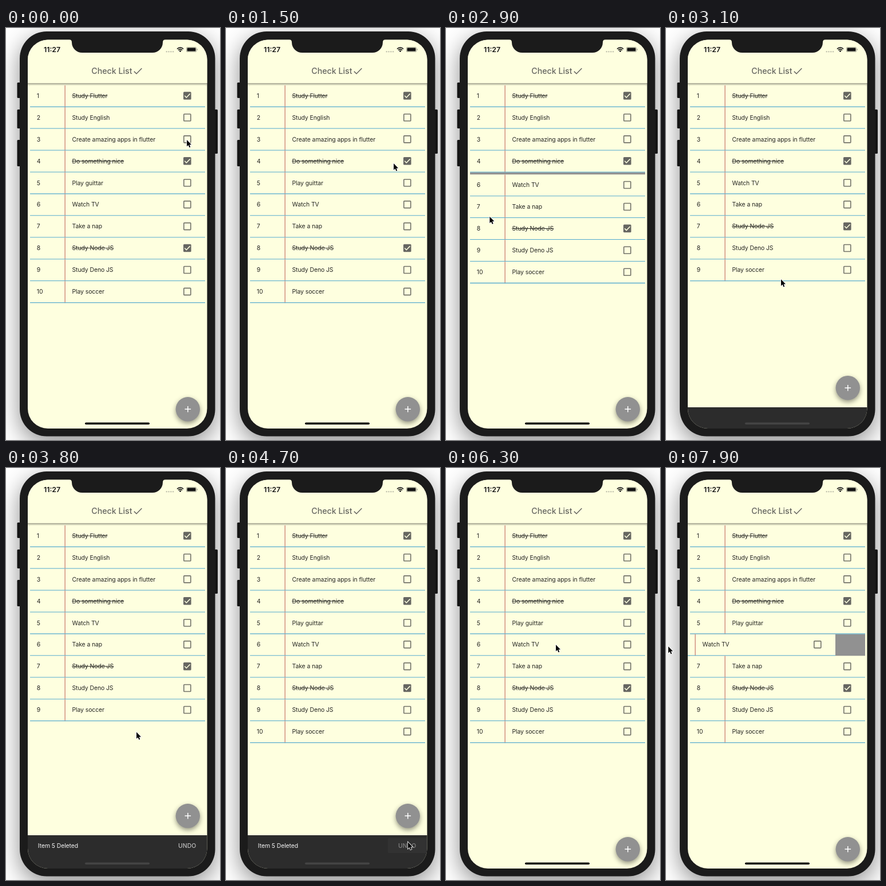
An HTML page with a canvas that plays this animation: 374 px wide and 718 px high, repeating every 8 s.

```html
<!DOCTYPE html>
<html lang="en">
<head>
<meta charset="utf-8">
<title>Check List</title>
<style>
html, body { margin: 0; width: 100%; height: 100%; overflow: hidden; background: #fff; }
canvas { display: block; width: 374px; height: 718px; }
</style>
</head>
<body>
<canvas id="stage"></canvas>
<script>
const LOOP = 8000, STEP = 100;
const CREAM = '#feffdf', BEZEL = '#1b1b1b', GREY = '#919191', INK = '#252522', DIM = '#666661';
const LIST = { left: 42, right: 348, top: 100, row: 37.93 };
const ITEMS = ['*Study Flutter', 'Study English', 'Create amazing apps in flutter', '*Do something nice',
  'Play guittar', 'Watch TV', 'Take a nap', '*Study Node JS', 'Study Deno JS', 'Play soccer']
  .map(s => ({ label: s.replace('*', ''), done: s[0] === '*' }));

// Keyframes: [time, value, ...]
const POINTER = [
  [1000, 316, 195], [1500, 293, 236], [1800, 275, 265], [2000, 268, 270], [2500, 25, 272],
  [2600, 14, 273], [2800, 14, 274], [3100, 201, 438], [3300, 212, 432], [3700, 210, 422],
  [4300, 318, 652], [4800, 318, 652], [5200, 230, 530], [5300, 230, 530], [6200, 192, 308],
  [6300, 192, 308], [6500, 194, 309], [7000, 194, 309], [7400, 296, 312], [7500, 296, 312],
  [7700, 225, 312], [7900, 4, 311]];
const FIRST_SWIPE = [[2030, 0], [2500, -227], [2620, -306]];
const SECOND_SWIPE = [[7700, 0], [7800, -12], [7900, -52]];
const COLLAPSE = [[2720, 1], [2920, 0]];
const REMOVED = [2950, 4600];

const canvas = document.getElementById('stage');
const c = canvas.getContext('2d');
const dpr = window.devicePixelRatio || 1;
canvas.width = 374 * dpr;
canvas.height = 718 * dpr;

const clamp = x => Math.min(1, Math.max(0, x));

function track(keys, t) {
  const next = keys.findIndex(k => k[0] > t);
  if (next === 0) return keys[0].slice(1);
  if (next < 0) return keys[keys.length - 1].slice(1);
  const a = keys[next - 1], b = keys[next];
  const f = (t - a[0]) / (b[0] - a[0]);
  return a.slice(1).map((v, i) => v + (b[i + 1] - v) * f);
}

function rect(x, y, w, h, fill, r = 0) {
  c.beginPath();
  c.roundRect(x, y, w, h, r);
  c.fillStyle = fill;
  c.fill();
}

function polyline(points, color, width) {
  c.beginPath();
  points.forEach(([x, y]) => c.lineTo(x, y));
  c.strokeStyle = color;
  c.lineWidth = width;
  c.stroke();
}

function text(s, x, y, size, color, weight = 400, spacing = 0) {
  c.font = `${weight} ${size}px Inter, "Open Sans", sans-serif`;
  c.letterSpacing = spacing + 'px';
  c.fillStyle = color;
  c.fillText(s, x, y);
  return c.measureText(s).width;
}

function shadowed(color, blur, dy, draw) {
  c.save();
  c.shadowColor = color;
  c.shadowBlur = blur * dpr;
  c.shadowOffsetY = dy * dpr;
  draw();
  c.restore();
}

function drawBody() {
  for (const [x, y, h] of [[19.5, 95, 27], [19.5, 142, 33], [19.5, 195, 46], [363, 142, 77]])
    rect(x, y, 7, h, BEZEL, 1.5);
  shadowed('rgba(0,0,0,.45)', 40, 12, () => rect(24, 6, 341.5, 705.5, BEZEL, 47));
}

function drawNotch() {
  c.beginPath();
  c.moveTo(110, 19);
  c.lineTo(110, 20);
  c.quadraticCurveTo(115, 20, 115, 25);
  c.arcTo(115, 43, 133, 43, 18);
  c.arcTo(274, 43, 274, 25, 18);
  c.lineTo(274, 25);
  c.quadraticCurveTo(274, 20, 279, 20);
  c.lineTo(279, 19);
  c.fillStyle = BEZEL;
  c.fill();
}

function drawStatus() {
  text('11:27', 66, 42, 12.3, '#111', 600);
  for (let i = 0; i < 4; i++) rect(279.5 + i * 3.8, 40, 2.4, 2.4, '#c3c4b0', 1.2);
  c.strokeStyle = '#111';
  c.lineWidth = 1.7;
  for (const r of [4.9, 7.8]) {
    c.beginPath();
    c.arc(304.5, 42, r, -Math.PI * 0.75, -Math.PI * 0.25);
    c.stroke();
  }
  c.beginPath();
  c.moveTo(304.5, 42);
  c.arc(304.5, 42, 2.9, -Math.PI * 0.75, -Math.PI * 0.25);
  c.fillStyle = '#111';
  c.fill();
  rect(315, 33, 18, 9, '#a2a392', 2.6);
  rect(315.8, 33.8, 16.4, 7.4, CREAM, 2);
  rect(316.5, 34.5, 15, 6, '#111', 1.3);
  rect(333.6, 36, 1.2, 3, '#a2a392', 0.6);
}

function drawAppBar() {
  shadowed('rgba(0,0,0,.42)', 4, 1.5, () => rect(30, 10, 330, 86, CREAM));
  text('Check List', 149.3, 80, 14.2, DIM, 500);
  polyline([[223.8, 75.6], [228, 79.8], [237.3, 70.3]], DIM, 1.5);
}

function drawCheckbox(x, y, done) {
  if (!done) {
    c.beginPath();
    c.roundRect(x - 6, y - 6, 12, 12, 0.8);
    c.strokeStyle = '#73736a';
    c.lineWidth = 1.6;
    c.stroke();
    return;
  }
  rect(x - 6.8, y - 6.8, 13.6, 13.6, DIM, 1.5);
  polyline([[x - 4.6, y], [x - 1.5, y + 3.2], [x + 4.8, y - 3.4]], CREAM, 1.5);
}

function drawRow(item, number, y, shift, scale) {
  const { left, right, row } = LIST, width = right - left;
  if (shift) rect(left, y, width, row * scale, GREY);
  if (shift <= -width) return;
  c.save();
  c.translate(shift, y);
  rect(left, 0, width, row, CREAM);
  rect(102.6, 0, 1, row, '#bd5953');
  text(String(number), 53.8, 21.8, 10.4, INK);
  const w = text(item.label, 115.5, 21.8, 10.4, INK, 400, -0.07);
  if (item.done) rect(115.2, 17.7, w + 0.5, 0.9, INK);
  drawCheckbox(316.8, 18, item.done);
  rect(left, row - 1.3, width, 1.3, '#58add0');
  c.restore();
}

function drawList(t) {
  const removed = t >= REMOVED[0] && t < REMOVED[1];
  const swiping = t < REMOVED[0];
  let y = LIST.top, number = 1;
  ITEMS.forEach((item, i) => {
    if (i === 4 && removed) return;
    const shift = i === 4 && swiping ? track(FIRST_SWIPE, t)[0]
      : i === 5 ? track(SECOND_SWIPE, t)[0] : 0;
    const scale = i === 4 && swiping ? track(COLLAPSE, t)[0] : 1;
    drawRow(item, number++, y, shift, scale);
    y += LIST.row * scale;
  });
}

function drawSnackbar(t) {
  const enter = clamp((t - 3000) / 250), leave = clamp((t - 4750) / 300);
  const rise = 58 * (1 - (1 - enter) ** 2) * (1 - leave) ** 2;
  const top = 698 - rise;
  if (rise > 0) {
    rect(38, top, 314, 60, '#2c2c2c');
    c.globalAlpha = clamp((enter - 0.45) / 0.4) * clamp(1 - leave * 2);
    const pressed = t >= 4500;
    if (pressed) rect(283, top + 5, 68, 26, '#323232', 1.5);
    text('Item 5 Deleted', 55.8, top + 21.5, 10.4, '#f4f4f4', 400, -0.07);
    text('UNDO', 301, top + 21.5, 10.4, pressed ? '#858585' : '#bdbdbd', 500, 0.1);
    c.globalAlpha = 1;
  }
  rect(138, 687.5, 113, 3.6, rise > 8 ? '#444' : '#050505', 1.8);
  drawAddButton(664.3 - rise);
}

function drawAddButton(y) {
  const x = 317.8;
  shadowed('rgba(0,0,0,.42)', 8, 3.5, () => rect(x - 21.2, y - 21.2, 42.4, 42.4, GREY, 21.2));
  polyline([[x - 5.3, y], [x + 5.3, y]], '#fff', 1.5);
  polyline([[x, y - 5.3], [x, y + 5.3]], '#fff', 1.5);
}

function drawPointer(t) {
  const [x, y] = track(POINTER, t);
  c.save();
  c.translate(x, y);
  c.beginPath();
  for (const [px, py] of [[0, 0], [0, 11.4], [2.6, 9.1], [4.4, 13.2], [6.3, 12.4], [4.6, 8.4], [8, 8.2]])
    c.lineTo(px, py);
  c.closePath();
  c.strokeStyle = '#fff';
  c.lineWidth = 1.6;
  c.stroke();
  c.fillStyle = '#050505';
  c.fill();
  c.restore();
}

function render(t) {
  c.setTransform(dpr, 0, 0, dpr, 0, 0);
  rect(0, 0, 374, 718, '#fff');
  drawBody();
  c.save();
  c.beginPath();
  c.roundRect(38, 20.5, 313.5, 677.5, 35);
  c.clip();
  rect(38, 20, 314, 680, CREAM);
  drawAppBar();
  drawList(t);
  drawSnackbar(t);
  drawStatus();
  c.restore();
  drawNotch();
  drawPointer(t);
}

const start = performance.now();
function frame() {
  const t = (performance.now() - start) % LOOP;
  render(Math.floor(t / STEP) * STEP);
  requestAnimationFrame(frame);
}
frame();
</script>
</body>
</html>
```
